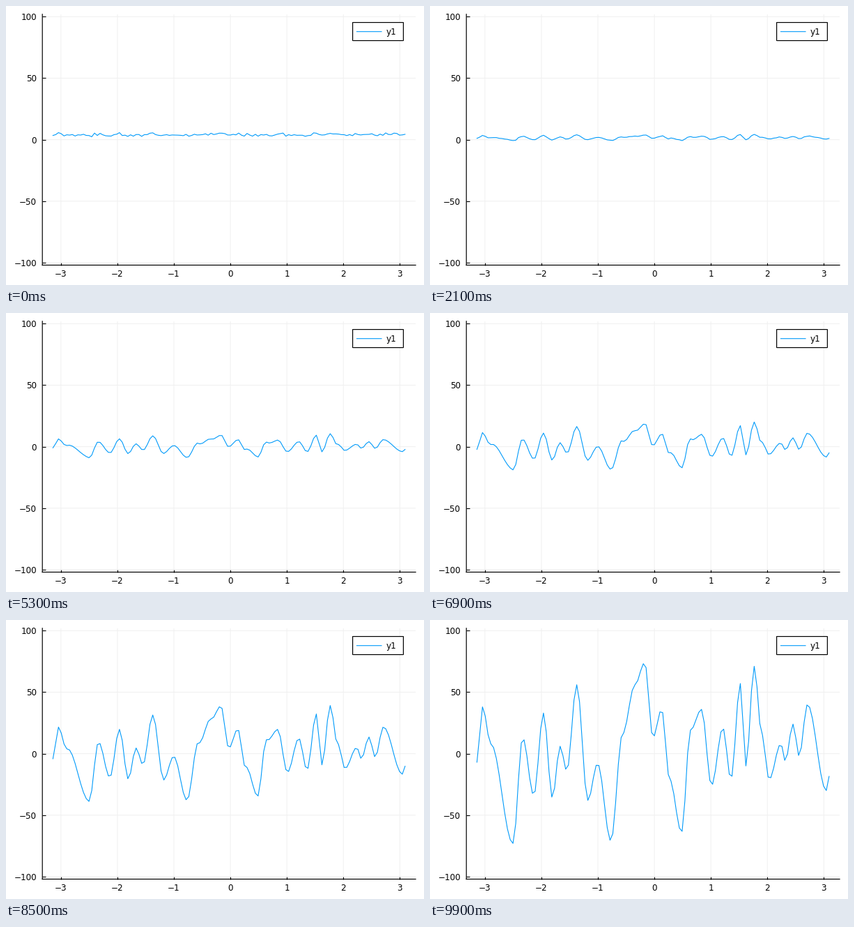
Recreate the animation shown at these times as a matplotlib script. Size 600 by 400 pixels, loop 10 s.

```python
import numpy as np
import matplotlib.pyplot as plt
from matplotlib.animation import FuncAnimation
from matplotlib.patches import Rectangle

W, H, DPI = 600, 400, 100
FRAMES, STEP = 100, 100
PX = 72 / DPI  # one pixel in points
BLUE = "#009afa"
N = 128
T_END = (FRAMES - 1) * STEP / 1000

plt.rcParams.update({"font.family": "DejaVu Sans", "font.size": 12 * PX,
                     "path.snap": False})

# Crests and troughs of the last wave: (grid index, height).
TURNS = [
    (0, -7), (2, 38), (5, 8), (13, -73), (16.5, 13), (20.5, -34), (24, 33),
    (27.2, -36), (30, 6), (32.4, -14), (36, 56), (40, -38), (43.5, -8),
    (48.3, -71), (52.5, 16), (57, 56), (60.5, 74), (63.5, 13), (66.6, 36),
    (69.5, -21), (73.8, -64), (77, 19), (81, 36), (84.6, -26), (88.7, 21),
    (91.6, -21), (95, 57), (97, -10), (100, 71), (102.7, 16), (105.4, -21),
    (109.6, 8), (111.2, -6), (114, 24), (116.2, -2), (119.2, 40),
    (126, -30), (128, -7)]


def ease_through(points, at):
    """Cosine easing from one turning point to the next."""
    px, py = np.array(points).T
    i = np.searchsorted(px, at, side="right") - 1
    s = (at - px[i]) / (px[i + 1] - px[i])
    return py[i] + (py[i + 1] - py[i]) * (1 - np.cos(np.pi * s)) / 2


grid = np.arange(N)
x = -np.pi + 2 * np.pi * grid / N

# Long waves grow faster than short ones; the initial noise fades out.
k = np.arange(N // 2 + 1)
growth = 0.35 + 0.15 * np.exp(-(k / 14) ** 2)
last_hat = np.fft.rfft(ease_through(TURNS, grid))
noise = np.random.default_rng(4).normal(0, 0.6, N)


def profile(t):
    wave = np.fft.irfft(last_hat * np.exp(-growth * (T_END - t)), N)
    return wave + noise * np.exp(-0.7 * t) + 4 * np.exp(-0.45 * t)


fig = plt.figure(figsize=(W / DPI, H / DPI), dpi=DPI, facecolor="white")


def pixel_box(left, top, right, bottom):
    return [left / W, 1 - bottom / H, (right - left) / W, (bottom - top) / H]


ax = fig.add_axes(pixel_box(52.2, 11.8, 588, 371.5))
margin = 0.03 * (x[-1] - x[0])
ax.set_xlim(x[0] - margin, x[-1] + margin)
ax.set_ylim(-102, 102)
ax.set_xticks(range(-3, 4))
ax.set_yticks(range(-100, 101, 50))
ax.tick_params(direction="in", length=4.5 * PX, width=1.1 * PX)
ax.tick_params(axis="x", pad=6.5 * PX)
ax.tick_params(axis="y", pad=8.2 * PX)
ax.grid(color="#f0f0f0", linewidth=PX)
ax.set_axisbelow(True)
ax.spines[["top", "right"]].set_visible(False)
ax.spines[["left", "bottom"]].set_linewidth(1.2 * PX)
curve, = ax.plot(x, profile(0), color=BLUE, linewidth=1.1 * PX,
                 solid_joinstyle="round")

# Legend, laid out in pixels.
key = fig.add_axes([0, 0, 1, 1])
key.set(xlim=(0, W), ylim=(H, 0))
key.axis("off")
key.add_patch(Rectangle((497.6, 23.6), 72.8, 26, facecolor="white",
                        edgecolor="black", linewidth=1.2 * PX))
key.plot([503.5, 539], [36.7, 36.7], color=BLUE, linewidth=1.1 * PX)
key.text(545.3, 41.2, "y1", va="baseline")


def update(i):
    curve.set_ydata(profile(i * STEP / 1000))
    return curve,


anim = FuncAnimation(fig, update, frames=FRAMES, interval=STEP,
                     repeat=True, repeat_delay=0)
plt.show()
```
